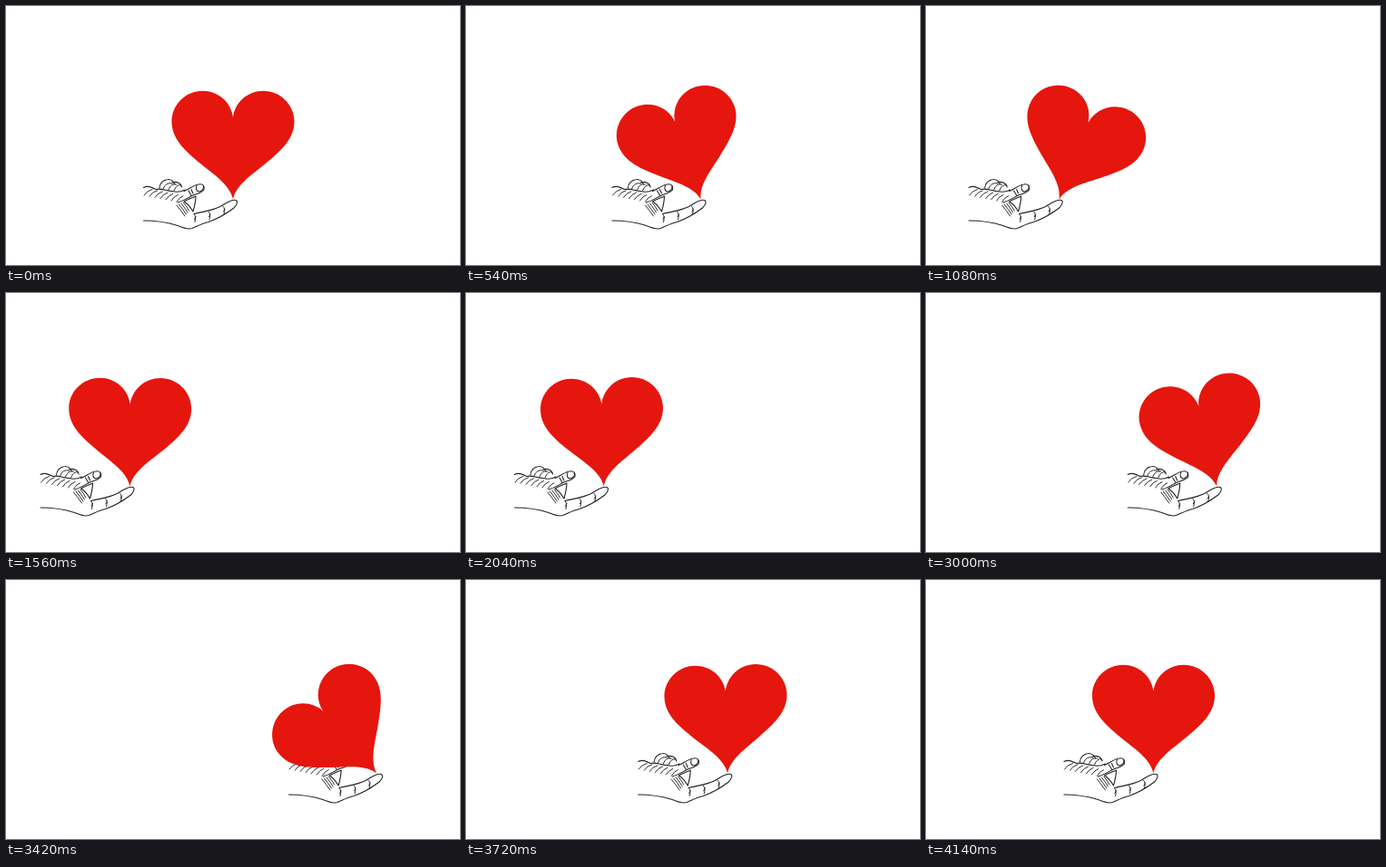
These frames come from a looping animation (500x286 px, 4200 ms). An HTML page:

```html
<!DOCTYPE html>
<html lang="en">
<head>
<meta charset="utf-8">
<title>Balancing heart</title>
<style>
html, body { margin: 0; height: 100%; overflow: hidden; background: #fff; }
svg { display: block; width: 500px; height: 286px; }
#hand { fill: none; stroke: #222; stroke-width: 1.1; stroke-linecap: round; stroke-linejoin: round; }
#creases { stroke-width: .95; }
</style>
</head>
<body>
<svg viewBox="0 0 500 286">
  <g id="hand">
    <!-- wrist, palm and index finger -->
    <path d="M.5 237C14 237 27 239 38 242.500C44 245 50 247 54 245.500C60 243 65 240 72 238.500C82 235 92 229 100 223C104 219 105 214.500 101 214.300C96 214 91 218 85 221.500C76 226 66 227 56 229.500"/>
    <!-- top of the wrist -->
    <path d="M.5 200.500C5 198 9 200 14 202.500C20 201 25 204 32 204.500C37 206 42 205 46 203"/>
    <!-- thumb and nail -->
    <path d="M45 204.500C51 202 56 197.500 61 197C66 196 68 199 67 203C64 207 59 207 55 209C49 212 45 215 38 217"/>
    <path d="M59 198.500C57.500 201 58.500 204.500 61.500 205C65 204.500 67 202 66.500 198.500M50 204L53 209M53 202.500L55 207"/>
    <!-- curled fingers -->
    <path d="M18 201C18 196 22 192 27 191.500C31 191 34 194 35 197M32 195C37 193 42 196 42.500 200"/>
    <!-- folds where thumb and palm meet -->
    <path d="M45 216C50 213 54 212 58 210C58 215 57 220 55 227C52 222 50 219 46 216.500"/>
    <path id="creases"/>
  </g>
  <path id="heart" fill="#e5160e" d="M0-90.500C-2-107-16-119.700-33.500-119.700C-52-119.700-67.500-104.500-67.500-86C-67.500-66-52-53-34-38C-19-26-3-15 0 0C3-15 19-26 34-38C52-53 67.500-66 67.500-86C67.500-104.500 52-119.700 33.500-119.700C16-119.700 2-107 0-90.500Z"/>
</svg>
<script>
const LOOP = 4200, STEP = 60;

// Turning points as [time, value]: left edge of the hand, tilt of the heart
const sway = [[0, 151], [420, 168], [1270, 29], [2010, 54], [2370, 0], [3360, 317], [3900, 144.5], [4140, 151.5]];
const lean = [[0, 0], [520, -18.5], [1290, 29.5], [1770, -20], [2450, 33], [3400, -41], [3920, 18], [4140, 0]];

const hand = document.getElementById('hand');
const heart = document.getElementById('heart');

// Swings smoothly from one turning point to the next, then rests
function swing(points, t) {
  const i = points.findIndex(p => p[0] > t);
  if (i < 0) return points.at(-1)[1];
  const [t0, a] = points[i - 1], [t1, b] = points[i];
  const u = (t - t0) / (t1 - t0);
  return a + (b - a) * u * u * (3 - 2 * u);
}

function repeat(count, line) {
  return Array.from({ length: count }, (_, i) => line(i)).join('');
}

document.getElementById('creases').setAttribute('d',
  // back of the hand
  repeat(7, i => `M${1 + 6 * i} ${209 + 1.2 * i}q3 -5 ${9 - i / 3} -6.5`) +
  // knuckles
  repeat(3, i => `M${22 + 6 * i} ${202 + i}q3 -8 ${10 - i} -6`) +
  // palm
  repeat(4, i => `M${37 + 2.5 * i} ${220 - i}q4 5 ${9 - i} ${12 - i}`) +
  // finger joints
  repeat(3, i => `M${56 + 16 * i} ${229.5 - i * (1 + 1.6 * i)}q3 3 1 9m1 -6l-1.500 3`)
);

function draw(now) {
  const t = Math.floor(now % LOOP / STEP) * STEP;
  const x = swing(sway, t), tilt = swing(lean, t);
  hand.setAttribute('transform', `translate(${x} 0)`);
  heart.setAttribute('transform', `translate(${x + 99 + .04 * tilt} 213.5) rotate(${tilt})`);
}

const start = performance.now();
function tick() {
  draw(performance.now() - start);
  requestAnimationFrame(tick);
}
tick();
</script>
</body>
</html>
```
